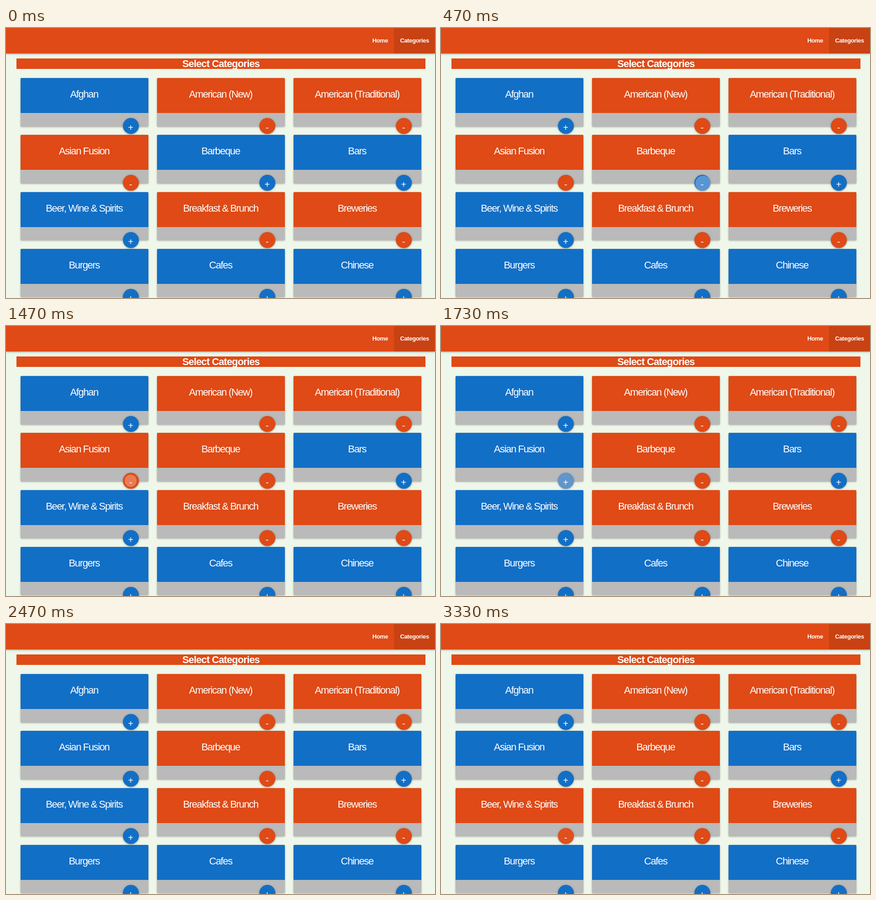
These frames come from a looping animation (943 px wide and 594 px high, 3390 ms). An HTML page:

```html
<!DOCTYPE html>
<html lang="en">
<head>
<meta charset="utf-8">
<title>Select Categories</title>
<style>
  html, body { margin: 0; width: 100%; height: 100%; overflow: hidden; }
  body {
    position: relative; background: #eff7ea; color: #fff; text-align: center;
    font-family: "Liberation Sans", Arial, sans-serif;
  }
  nav, nav span, h1, .card, .btn, .wave { position: absolute; white-space: nowrap; }
  nav {
    left: 0; top: 0; width: 943px; height: 55.5px; background: #df4a16;
    box-shadow: 0 1px 3px rgba(0,0,0,.3), 0 1px 6px rgba(0,0,0,.14);
    font: bold 13px/56px "Liberation Sans", Arial, sans-serif; letter-spacing: -.35px;
  }
  nav span { top: 0; height: 55.5px; }
  .home { left: 792px; width: 61px; }
  .active { left: 853px; width: 90px; background: #c84213; }
  h1 {
    left: 23px; top: 66.5px; width: 899px; height: 23.5px; margin: 0; background: #df4a16;
    font-size: 22px; line-height: 23.5px; letter-spacing: -.87px;
  }
  .card {
    width: 280.5px; height: 106.5px; border-radius: 2px; background: #bababa;
    box-shadow: 0 1px 3px rgba(0,0,0,.2), 0 1px 5px rgba(0,0,0,.1);
  }
  .name {
    height: 77px; border-radius: 2px 2px 0 0; text-indent: -1px;
    font-size: 22px; line-height: 71px; letter-spacing: -1.35px;
  }
  .btn {
    left: 224.5px; top: 88.2px; width: 35px; height: 35px; border-radius: 50%; overflow: hidden;
    font-size: 20px; line-height: 43px;
    box-shadow: 0 1px 3px rgba(0,0,0,.28), 0 1px 6px rgba(0,0,0,.14);
  }
  .wave { width: 0; height: 0; border-radius: 50%; background: #fff; }
</style>
</head>
<body>
<nav><span class="home">Home</span><span class="active">Categories</span></nav>
<h1>Select Categories</h1>
<script>
const LOOP = 3390, FADE = 300;
const BLUE = [18, 111, 198], ORANGE = [223, 74, 22];
const names = ["Afghan", "American (New)", "American (Traditional)",
  "Asian Fusion", "Barbeque", "Bars",
  "Beer, Wine & Spirits", "Breakfast & Brunch", "Breweries",
  "Burgers", "Cafes", "Chinese"];
const chosen = [1, 2, 3, 7, 8];
// Pointer position is relative to the button
const clicks = [
  { card: 4, press: 370, toggle: 445, x: 19.5, y: 18.5 },
  { card: 3, press: 1400, toggle: 1485, x: 17.5, y: 17 },
  { card: 6, press: 2690, toggle: 2770, x: 17.5, y: 12 }
];

const clamp = v => Math.min(1, Math.max(0, v));
const smooth = v => v * v * (3 - 2 * v);
const mix = (a, b, k) => `rgb(${a.map((v, i) => Math.round(v + (b[i] - v) * k))})`;

function add(parent, cls, text = "") {
  const el = document.createElement("div");
  el.className = cls;
  el.textContent = text;
  return parent.appendChild(el);
}

const cards = names.map((name, i) => {
  const box = add(document.body, "card");
  box.style.left = 32 + (i % 3) * 300 + "px";
  box.style.top = 110 + Math.floor(i / 3) * 125.3 + "px";
  const head = add(box, "name", name);
  const btn = add(box, "btn");
  const sign = add(btn, "sign");
  const wave = add(btn, "wave");
  return { head, btn, sign, wave, on: chosen.includes(i) };
});

function paint(card, on, k = 1) {
  const [from, to] = on ? [BLUE, ORANGE] : [ORANGE, BLUE];
  card.head.style.background = mix(from, to, 1);
  card.btn.style.background = mix(from, to, k);
  card.sign.textContent = on ? "-" : "+";
}

function ripple(card, age, x, y) {
  const r = age > 0 ? 40 * (1 - Math.exp(-age / 180)) : 0;
  const s = card.wave.style;
  s.left = x - r + "px";
  s.top = y - r + "px";
  s.width = s.height = 2 * r + "px";
  s.opacity = .28 * (1 - clamp((age - 330) / 350));
}

function draw(t) {
  for (const c of clicks) {
    const card = cards[c.card];
    const done = t >= c.toggle;
    paint(card, card.on !== done, done ? smooth(clamp((t - c.toggle) / FADE)) : 1);
    ripple(card, t - c.press, c.x, c.y);
  }
}

cards.forEach(card => paint(card, card.on));
const start = performance.now();
function tick() {
  draw((performance.now() - start) % LOOP);
  requestAnimationFrame(tick);
}
tick();
</script>
</body>
</html>
```
